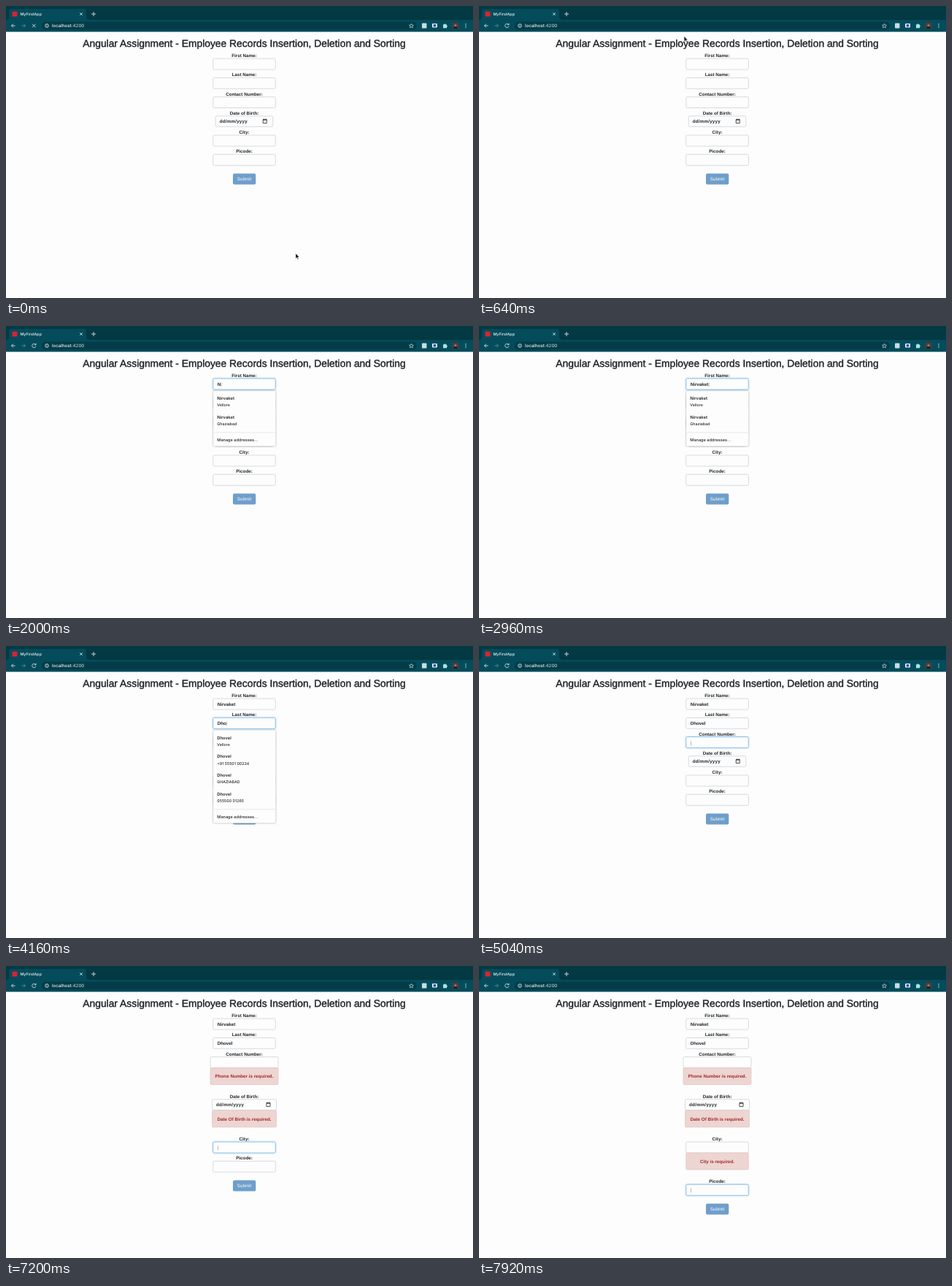
An HTML page for the animation above (8000 ms loop, 640 by 400 pixels).

```html
<!DOCTYPE html>
<html lang="en">
<head>
<meta charset="utf-8">
<title>Employee records form</title>
<style>
  html, body { margin: 0; width: 100%; height: 100%; overflow: hidden; background: #fdfdfd; }
  svg { display: block; width: 640px; height: 400px; }
  text { font-family: "Liberation Sans", Arial, sans-serif; font-size: 6.25px; fill: #212529; text-rendering: geometricPrecision; }
  .bold { font-weight: 700; }
  .mid { text-anchor: middle; }
  .ui { font-family: Inter, sans-serif; font-size: 5.3px; font-weight: 500; }
  .name { font-size: 5.8px; font-weight: 600; }
  .title { font-size: 13.85px; stroke: #212529; stroke-width: .42px; }
  .error { fill: #a3272b; }
  .caret { font-weight: 400; fill: #777; }
  .input { fill: #fdfdfd; stroke: #ced2d6; stroke-width: .8; }
  .focus { stroke: #86bde8; stroke-width: .9; filter: drop-shadow(0 0 1px #a9d2f2); }
  .alert { fill: #edd5d2; stroke: #e2bdba; stroke-width: .6; }
  .popup { fill: #fdfdfd; stroke: #dcdcdc; stroke-width: .5; filter: drop-shadow(0 .8px 1px #0004); }
  .icon { fill: none; stroke: #d5e3e6; stroke-width: .9; }
</style>
</head>
<body>
<svg viewBox="0 0 640 400">
  <rect width="640" height="35.400" fill="#044c5b"/>
  <path d="M0 0H640V19H114Q110 19 110 15V7Q110 4 107 4H7Q4 4 4 7V15Q4 19 0 19Z" fill="#023943"/>
  <rect x="49" y="21.5" width="514" height="11" rx="5.5" fill="#033c48"/>
  <rect x="8.5" y="7.5" width="7" height="7" rx="1" fill="#d8232f"/>
  <text class="ui" x="19.5" y="13" style="fill:#eef4f5">MyFirstApp</text>
  <text class="ui" x="63" y="29.2" style="fill:#f2f7f8;font-size:6.15px">localhost<tspan fill="#b4cace">:4200</tspan></text>
  <g class="icon">
    <path d="M101.300 9.300l3.400 3.400m0-3.400l-3.400 3.400M117 11h6m-3-3v6M12.500 27H7.500m2.300-2.400L7.500 27l2.300 2.400"/>
    <path d="M21.500 27h5m-2.300-2.400l2.300 2.400l-2.300 2.400" stroke="#5d8a94"/>
    <path id="loading" d="M36 24.700l4.600 4.600m0-4.600l-4.600 4.600"/>
    <path id="reload" d="M40.300 25.300A2.600 2.600 0 1 0 40.800 27.800M41 23.800v2h-2"/>
    <circle cx="56" cy="27" r="2.400"/>
    <path d="M56 26.600v1.700M56 25.300v.6"/>
    <path d="M555.500 24.200l.9 1.900 2.100.2-1.600 1.400.5 2.100-1.900-1.100-1.900 1.100.5-2.100-1.600-1.400 2.100-.2Z" stroke-width=".7"/>
  </g>
  <rect x="570" y="23.500" width="6.500" height="7" rx="1" fill="#c8dce2"/>
  <rect x="584" y="24" width="7" height="5.500" rx="1" fill="#e4ecf4"/>
  <rect x="585.700" y="25" width="3.600" height="3.500" rx="1" fill="#2b50b4"/>
  <path d="M599 25.300h1.500a1 1 0 0 1 2 0h1.500v1.500a1 1 0 0 1 0 2v1.500h-5Z" fill="#a8e0e4"/>
  <rect x="612" y="23" width="8" height="8" fill="#5b3a35"/>
  <path d="M613 31q0-3 3-3t3 3Z" fill="#1e2228"/>
  <circle cx="616" cy="26.500" r="1.500" fill="#a87a68"/>
  <g fill="#d5e3e6"><circle cx="630" cy="24.800" r=".7"/><circle cx="630" cy="27" r=".7"/><circle cx="630" cy="29.200" r=".7"/></g>
  <text class="title mid" x="326.500" y="56.200">Angular Assignment - Employee Records Insertion, Deletion and Sorting</text>
  <g id="form"></g>
  <path id="arrow" d="M0 0V7l1.600-1.500 1.200 2.600 1.100-.5-1.200-2.500H5Z" fill="#111" stroke="#fff" stroke-width=".4"/>
  <path id="beam" d="M-1.500-3.500Q0-3.500 0-2.500Q0-3.500 1.500-3.500M0-2.500V2.500M-1.500 3.500Q0 3.500 0 2.500Q0 3.500 1.500 3.500" fill="none" stroke="#222" stroke-width=".7"/>
</svg>
<script>
const LOOP = 8000, CENTER = 326.5, PITCH = 26.25, ALERT_SHIFT = 32, ROW = 25.8;
const FIRST = "Nirvaket", LAST = "Dhovel";
const lastKeys = [3600, 3760, 4000, 4240, 4400, 4560];
const firstKeys = [...FIRST].map((_, i) => 1920 + i * 120);

const fields = [
  { label: "First Name:", from: 960, to: 3360, value: FIRST, keys: firstKeys },
  { label: "Last Name:", from: 3440, to: 4880, value: LAST, keys: lastKeys },
  { label: "Contact Number:", from: 4880, to: 5760, error: "Phone Number is required.", wide: 93 },
  { label: "Date of Birth:", from: 5760, to: 6960, error: "Date Of Birth is required.", wide: 88, date: true },
  { label: "City:", from: 6960, to: 7520, error: "City is required.", wide: 85.5 },
  { label: "Picode:", from: 7520, to: LOOP },
];
const dateParts = [[5760, 0, 8], [6320, 10, 11.5], [6640, 23.5, 14.7], [6800, 60, 7]];

const firstMatches = [[FIRST, "Vellore"], [FIRST, "+91 55501 00234"], ["Somvath", "GHAZIABAD"],
  ["Belank", "(555) 555-0143"], ["Somvath", "055500 01265"]];
const filteredMatches = [[FIRST, "Vellore"], [FIRST, "Ghaziabad"]];
const lastMatches = ["Vellore", "+91 55501 00234", "GHAZIABAD", "055500 01265"].map(s => [LAST, s]);

const $ = id => document.getElementById(id);
const text = (x, y, cls, s) => `<text x="${x}" y="${y}" class="${cls}">${s}</text>`;
const rect = (x, y, w, h, cls, rx = 1.5) =>
  `<rect x="${x}" y="${y}" width="${w}" height="${h}" rx="${rx}" class="${cls}"/>`;
const line = y => `<path d="M284.500 ${y}h84.500" stroke="#e2e2e2" stroke-width=".8"/>`;

function dateInput(x, y, w, t, focused) {
  const left = x + 5.5;
  let out = "";
  if (focused) {
    const [, dx, dw] = dateParts.filter(p => t >= p[0]).pop();
    out += `<rect x="${left + dx}" y="${y + 3.3}" width="${dw}" height="7.800" fill="#6aa9e8"/>`;
  }
  const icon = x + w - 13.5;
  return out + `<text x="${left}" y="${y + 9.4}" class="bold" letter-spacing=".2">dd/mm/yyyy</text>
    <path d="M${icon} ${y + 4.7}h5v5h-5Zm0 .7h5M${icon + 1} ${y + 3.7}v1m3-1v1" fill="none" stroke="#222" stroke-width=".8"/>`;
}

function drawField(f, y, t) {
  const focused = t >= f.from && t < f.to;
  const failed = f.error && t >= f.to;
  const w = failed ? f.wide : f.date ? 78.5 : 85.5;
  const x = CENTER - w / 2;
  let out = text(CENTER, y - 2, "bold mid", f.label) + rect(x, y, w, f.date ? 14.5 : 15, "input" + (focused ? " focus" : ""));
  if (f.date) {
    out += dateInput(x, y, w, t, focused);
  } else {
    const keys = (f.keys || []).filter(k => t >= k);
    const idle = t - (keys.length ? keys[keys.length - 1] : f.from);
    const caret = focused && idle % 1000 < 500 ? `<tspan class="caret">|</tspan>` : "";
    out += text(289.7, y + 10, "bold", (f.value || "").slice(0, keys.length) + caret);
  }
  if (failed) out += rect(x, y + 15, w, 23, "alert") + text(CENTER, y + 28.8, "bold error mid", f.error);
  return out;
}

function popup(y, rows) {
  const base = y + rows.length * ROW;
  return rect(284, y, 85.5, rows.length * ROW + 24, "popup", 1) +
    rows.map(([name, detail], i) => text(289.3, y + 12.3 + i * ROW, "ui name", name) +
      text(289.3, y + 21.4 + i * ROW, "ui", detail)).join("") +
    line(base + 5.3) + text(289.3, base + 17, "ui", `<tspan font-size="5.600">Manage addresses...</tspan>`);
}

function drawForm(t) {
  let y = 72, out = "";
  for (const f of fields) {
    out += drawField(f, y, t);
    y += PITCH + (f.error && t >= f.to ? ALERT_SHIFT : 0);
  }
  out += `<rect x="311" y="${y}" width="31.300" height="15" rx="2" fill="#6f9ecb"/>` +
    `<text x="${CENTER}" y="${y + 9.6}" class="mid" style="fill:#fff">Submit</text>`;
  if (t >= 1040 && t < 3360) out += popup(89, t < firstKeys[0] ? firstMatches : filteredMatches);
  if (t >= lastKeys[0] && t < 4880) out += popup(115.3, lastMatches);
  return out;
}

const ease = (t, a, b) => {
  const p = Math.min(1, Math.max(0, (t - a) / (b - a)));
  return p * p * (3 - 2 * p);
};

function drawPointer(t) {
  const up = ease(t, 80, 640), over = ease(t, 600, 920);
  const x = 397 - 117 * up + 24.5 * over, y = 339 - 299 * up + 36 * over;
  const inField = y > 72 && y < 87;
  for (const id of ["arrow", "beam"]) {
    $(id).setAttribute("transform", `translate(${x} ${y})`);
    $(id).style.display = t < firstKeys[0] && (id === "beam") === inField ? "" : "none";
  }
}

let shown = "";
function frame(now) {
  const t = now % LOOP, markup = drawForm(t);
  if (markup !== shown) $("form").innerHTML = shown = markup;
  $("loading").style.display = t < 160 ? "" : "none";
  $("reload").style.display = t < 160 ? "none" : "";
  drawPointer(t);
  requestAnimationFrame(frame);
}
frame(0);
</script>
</body>
</html>
```
